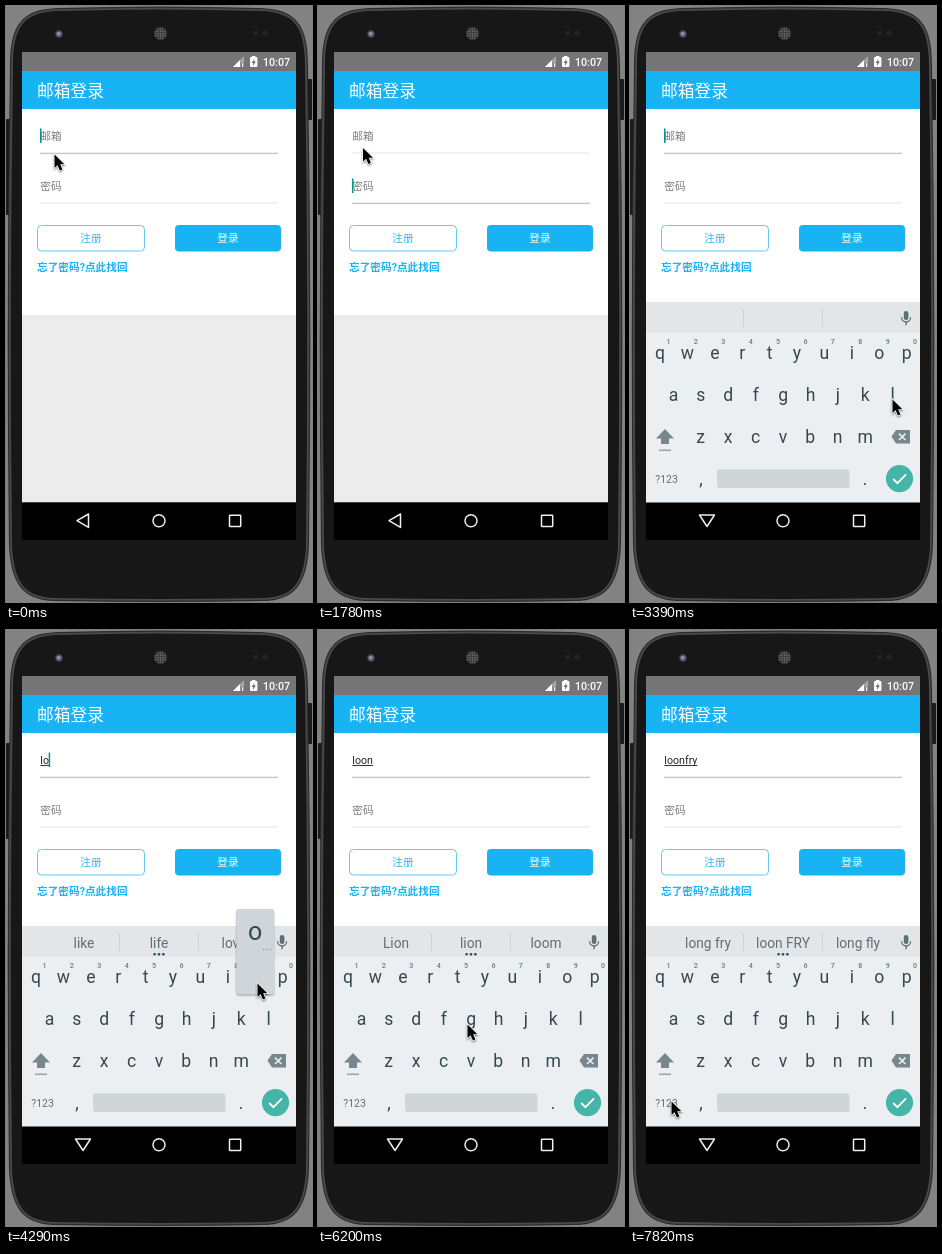
An HTML page with a canvas that plays this animation: 306 by 596 pixels, repeating every 8 s.

```html
<!DOCTYPE html>
<html lang="zh-CN">
<head>
<meta charset="utf-8">
<title>邮箱登录</title>
<style>
html, body { margin: 0; width: 100%; height: 100%; overflow: hidden; background: #828282; }
canvas { display: block; width: 306px; height: 596px; }
</style>
</head>
<body>
<canvas id="stage"></canvas>
<script>
const W = 306, H = 596, LOOP = 8000, STEP = 147.4, LAST = 53;
const canvas = document.getElementById('stage');
const ctx = canvas.getContext('2d');
const dpr = window.devicePixelRatio || 1;
canvas.width = W * dpr;
canvas.height = H * dpr;

const FONT = 'Roboto, "Noto Sans CJK SC", "Noto Sans CJK", sans-serif';
const BLUE = '#17b3f2', TEAL = '#009688', KEY = '#37474f', GREY = '#5f6f77';
const ROWS = ['qwertyuiop', 'asdfghjkl', 'zxcvbnm'];
const ROW_X = [30, 43.5, 70.7], ROW_Y = [353, 395, 437], PITCH = 27.4;

// Pointer tip: step, x, y
const PATH = [
  [0, 48, 148], [3, 47, 176], [5, 47, 176], [8, 46, 180], [10, 46, 180],
  [13, 44, 128], [17, 44, 128], [23, 262, 393], [25, 262, 393],
  [28, 251, 353], [31, 251, 353], [35, 209, 429], [38, 209, 429],
  [41, 149, 394], [42, 149, 394], [43, 128, 394], [45, 128, 394],
  [46, 114, 352], [48, 167, 352], [49, 160, 362], [53, 41, 471]
];
// Step from which the typed text holds
const TYPED = [
  [0, ''], [25, 'l'], [29, 'lo'], [31, 'loo'], [37, 'loon'],
  [43, 'loonf'], [46, 'loonfr'], [48, 'loonfry']
];
const HINTS = [
  [0, []], [26, ['like', 'life', 'love']], [30, ['love', 'look', 'long']],
  [32, ['looking', 'look', 'looks']], [38, ['Lion', 'lion', 'loom']],
  [49, ['long fry', 'loon FRY', 'long fly']]
];
const POPUPS = { 29: 'o', 31: 'o', 37: 'n', 43: 'f', 46: 'r', 48: 'y' };
const CARET_OFF = [[3, 5], [18, 20], [35, 36], [41, 42], [51, 53]];

const at = (list, k) => list.filter(e => e[0] <= k).pop()[1];

function pointerAt(k) {
  const i = PATH.findIndex(p => p[0] >= k);
  if (i <= 0) return PATH[0].slice(1);
  const [k0, x0, y0] = PATH[i - 1], [k1, x1, y1] = PATH[i];
  const u = (k - k0) / (k1 - k0), e = u * u * (3 - 2 * u);
  return [x0 + (x1 - x0) * e, y0 + (y1 - y0) * e];
}

function rect(x, y, w, h, color) {
  ctx.fillStyle = color;
  ctx.fillRect(x, y, w, h);
}

function round(x, y, w, h, r, fill, stroke, line = 1) {
  ctx.beginPath();
  ctx.roundRect(x, y, w, h, r);
  paint(fill, stroke, line);
}

function disc(x, y, r, fill, stroke, line = 1) {
  ctx.beginPath();
  ctx.arc(x, y, r, 0, 7);
  paint(fill, stroke, line);
}

function poly(points, fill, stroke, line = 1, open) {
  ctx.beginPath();
  points.forEach(([x, y]) => ctx.lineTo(x, y));
  if (!open) ctx.closePath();
  paint(fill, stroke, line);
}

function paint(fill, stroke, line) {
  if (fill) { ctx.fillStyle = fill; ctx.fill(); }
  if (stroke) { ctx.strokeStyle = stroke; ctx.lineWidth = line; ctx.stroke(); }
}

function text(s, x, y, size, color, align = 'left', weight = 400) {
  ctx.font = `${weight} ${size}px ${FONT}`;
  ctx.textAlign = align;
  ctx.fillStyle = color;
  ctx.fillText(s, x, y);
  return ctx.measureText(s).width;
}

function body(inset, fill) {
  const l = 1 + inset, r = 305 - inset, t = inset, b = H - inset;
  ctx.beginPath();
  ctx.moveTo(l + 3, 60);
  ctx.bezierCurveTo(l + 3, 20, l + 14, t + 3, 52, t + 2);
  ctx.quadraticCurveTo(153, t - 1, 254, t + 2);
  ctx.bezierCurveTo(r - 14, t + 3, r - 3, 20, r - 3, 60);
  ctx.quadraticCurveTo(r + 1, 300, r - 2, 540);
  ctx.bezierCurveTo(r - 4, 578, r - 16, b - 2, 258, b - 1);
  ctx.quadraticCurveTo(153, b + 1, 48, b - 1);
  ctx.bezierCurveTo(l + 16, b - 2, l + 4, 578, l + 2, 540);
  ctx.quadraticCurveTo(l - 1, 300, l + 3, 60);
  paint(fill);
}

function phone() {
  rect(0, 0, W, H, '#828282');
  round(0, 113, 5, 96, 1, '#1b1b1b');
  round(301, 73, 5, 41, 1, '#1b1b1b');
  body(0, '#2b2b2b');
  body(1.2, '#4a4a4a');
  body(3, '#171717');
  disc(53, 28, 4.2, '#34343c');
  disc(53, 28, 2.8, '#6a6b7c');
  disc(52.5, 27.5, 1.2, '#a5a6b8');
  disc(154.5, 27.5, 6.5, '#3a3a3a');
  for (let y = -2; y <= 2; y++)
    for (let x = -2; x <= 2; x++)
      if (x * x + y * y < 7) disc(154.5 + x * 2.3, 27.5 + y * 2.3, 0.7, '#777');
  disc(250, 27, 2.6, '#242424');
  disc(259, 27, 2.6, '#242424');
}

function statusBar() {
  rect(16, 46, 274, 19.5, '#757575');
  poly([[227, 61], [238, 61], [238, 50]], '#a6a6a6');
  poly([[227, 61], [234, 61], [234, 54]], '#fff');
  rect(234.6, 56.5, 3.4, 4.5, '#757575');
  rect(236, 57, 1.2, 4, '#fff');
  rect(246, 50, 3.4, 2, '#fff');
  round(244, 51, 7.4, 10, 0.8, '#fff');
  poly([[248.6, 52.6], [245.4, 57], [247.3, 57], [246.8, 60], [250, 55.6], [248, 55.6]], '#757575');
  text('10:07', 284, 60, 10.67, '#fff', 'right', 500);
}

function field(label, value, top, focused, caret) {
  let w = 0;
  if (value) {
    w = text(value, 34.3, top + 31, 10.67, '#222');
    rect(34.3, top + 32, w, 1, '#333');
  } else {
    text(label, 34.3, top + 31, 10.67, '#7c7c7c');
  }
  if (focused) rect(34, top + 43.7, 238, 1.4, '#c6c6c6');
  else rect(34, top + 43.5, 238, 1, '#e5e5e5');
  if (caret) rect(34 + w, top + 19.5, 1.5, 14.5, TEAL);
}

function page(k) {
  rect(16, 65, 274, 38, BLUE);
  text('邮箱登录', 31, 91, 16.76, '#fff');
  rect(16, 103, 274, 206, '#fff');
  rect(16, 309, 274, 187.5, '#ececec');
  const onPass = k >= 10 && k < 14;
  const caret = !CARET_OFF.some(([a, b]) => k >= a && k <= b);
  field('邮箱', at(TYPED, k), 103, !onPass, caret && !onPass);
  field('密码', '', 153, onPass, caret && onPass);
  round(31.5, 219.5, 107, 25.5, 4, '#fff', '#62c8f5');
  text('注册', 85, 236.3, 10.67, '#2fb9f2', 'center');
  round(169, 219, 106, 26.5, 4, BLUE);
  text('登录', 222, 236.3, 10.67, '#fff', 'center');
  text('忘了密码?点此找回', 31, 264.6, 10.67, BLUE, 'left', 700);
}

function mic() {
  round(273.8, 305, 4.6, 9, 2.3, GREY);
  ctx.beginPath();
  ctx.arc(276.1, 311.3, 4.6, 0, Math.PI);
  paint(null, GREY, 1.3);
  rect(275.4, 315.8, 1.4, 3.4, GREY);
}

function keyboard(k) {
  rect(16, 296, 274, 201, '#eceff1');
  rect(16, 296, 274, 31, '#e2e6e8');
  rect(113, 303, 1, 18, '#cdd3d6');
  rect(192, 303, 1, 18, '#cdd3d6');
  const hints = at(HINTS, k);
  hints.forEach((s, i) => text(s, 78 + i * 75, 317.5, 13.72, GREY, 'center'));
  if (hints.length) for (let i = -1; i < 2; i++) disc(153 + i * 4.4, 324.3, 1.3, KEY);
  mic();
  ROWS.forEach((row, r) => [...row].forEach((c, i) =>
    text(c, ROW_X[r] + i * PITCH, ROW_Y[r], 17.6, KEY, 'center')));
  [...'1234567890'].forEach((c, i) => text(c, 38.5 + i * PITCH, 338.3, 7.2, '#6b7a81', 'center', 500));

  poly([[35, 423], [44, 432.5], [39, 432.5], [39, 438], [31, 438], [31, 432.5], [26, 432.5]], '#78868d');
  rect(29, 443.5, 12, 1.6, '#9aa5aa');
  poly([[261.5, 430.5], [266, 424], [280, 424], [280, 437.5], [266, 437.5]], '#78868d');
  poly([[269, 427.6], [275.4, 434]], null, '#eceff1', 1.6, true);
  poly([[275.4, 427.6], [269, 434]], null, '#eceff1', 1.6, true);
  text('?123', 36.5, 476.5, 10.4, GREY, 'center');
  text(',', 71, 478.5, 17.6, KEY, 'center');
  round(87, 463.5, 132.5, 18.5, 2.5, '#cfd4d7');
  text('.', 235, 478.5, 17.6, KEY, 'center');
  disc(269.5, 472.6, 13.6, '#45b5aa');
  poly([[263.2, 473], [267.5, 477.2], [276, 468.4]], null, '#fff', 1.8, true);
}

function popup(c) {
  const r = ROWS.findIndex(row => row.includes(c));
  const x = ROW_X[r] + ROWS[r].indexOf(c) * PITCH, y = ROW_Y[r];
  ctx.save();
  ctx.shadowColor = 'rgba(0,0,0,.35)';
  ctx.shadowBlur = 2 * dpr;
  ctx.shadowOffsetY = dpr;
  round(x - 18.8, y - 74, 37.6, 85.5, 2.5, '#cfd6d9');
  ctx.restore();
  text(c, x, y - 43.5, 25, KEY, 'center');
  for (let i = 0; i < 3; i++) disc(x + 8.4 + i * 3.6, y - 33.5, 0.8, '#8b979c');
}

function navBar(open) {
  rect(16, 496.5, 274, 37.5, '#000');
  const back = open ? [[69.5, 509], [84.5, 509], [77, 520.5]] : [[71, 514.7], [82.5, 508], [82.5, 521.4]];
  ctx.lineJoin = 'round';
  poly(back, null, '#eee', 1.5);
  ctx.lineJoin = 'miter';
  disc(153, 514.8, 6, null, '#eee', 1.5);
  round(223.5, 509.3, 11.2, 11.2, 0.6, null, '#eee', 1.5);
}

function pointer([x, y]) {
  ctx.save();
  ctx.translate(x, y);
  ctx.shadowColor = 'rgba(0,0,0,.4)';
  ctx.shadowBlur = 2 * dpr;
  ctx.shadowOffsetY = dpr;
  const shape = [[0.5, 0.5], [0.5, 14], [3.6, 11.2], [5.9, 16.5], [8.4, 15.4], [6.2, 10.3], [10.4, 10.2]];
  poly(shape, '#000', '#fff', 1.6);
  ctx.shadowColor = 'transparent';
  poly(shape, '#000');
  ctx.restore();
}

function draw(t) {
  const k = Math.min(LAST, Math.floor(t / STEP));
  const shown = Math.max(0, Math.min(1, (k - 12) / 3));
  const drop = 201 * (1 - shown) ** 2;
  ctx.setTransform(dpr, 0, 0, dpr, 0, 0);
  phone();
  statusBar();
  page(k);
  if (shown > 0) {
    ctx.save();
    ctx.beginPath();
    ctx.rect(16, 296, 274, 201);
    ctx.clip();
    ctx.translate(0, drop);
    keyboard(k);
    ctx.restore();
  }
  navBar(shown > 0);
  if (POPUPS[k]) popup(POPUPS[k]);
  pointer(pointerAt(k));
}

function tick() {
  draw(performance.now() % LOOP);
  requestAnimationFrame(tick);
}
tick();
</script>
</body>
</html>
```
